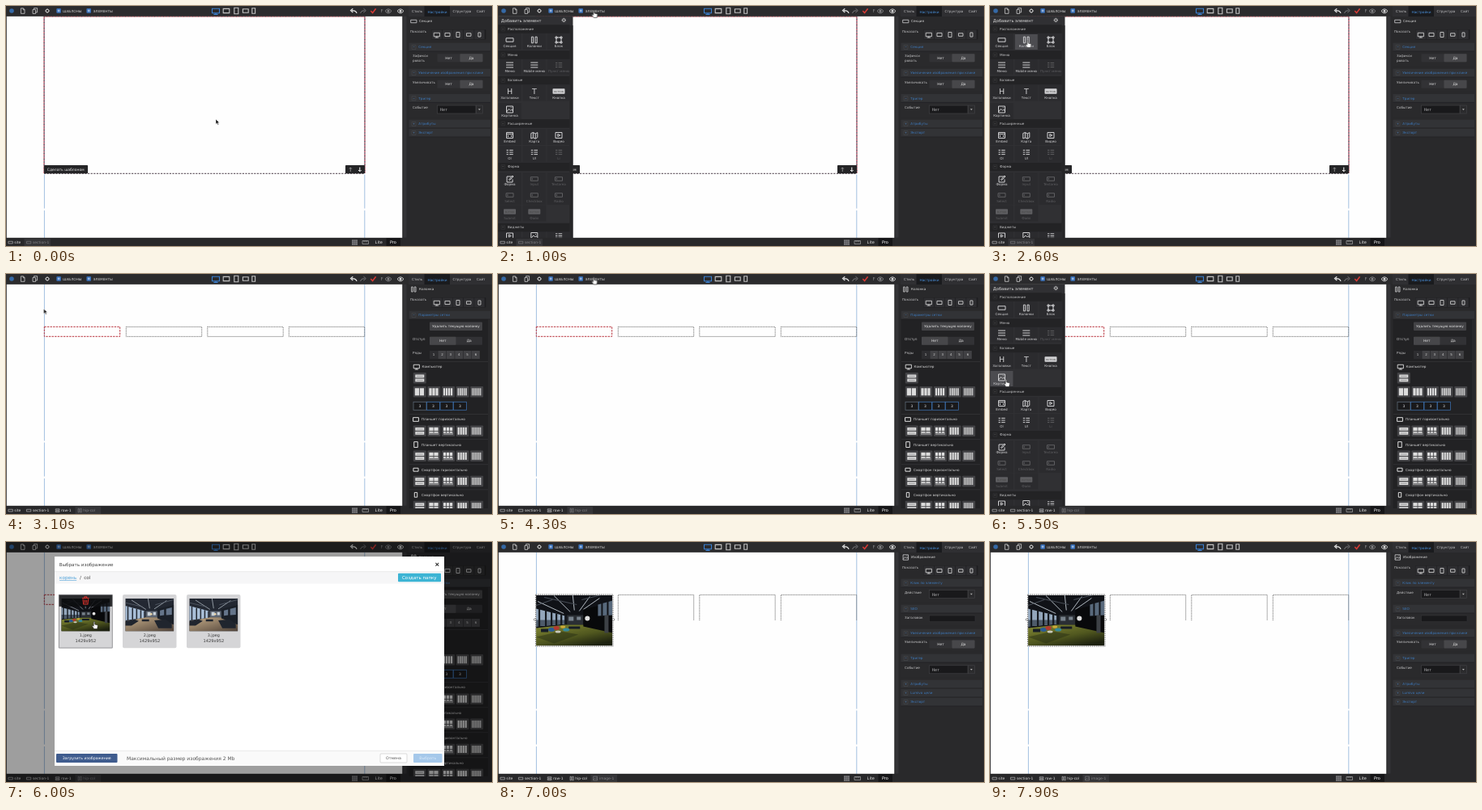
These frames come from a looping animation (600x297 px, 8 s). An HTML page:

```html
<!DOCTYPE html>
<html lang="ru">
<head>
<meta charset="utf-8">
<title>Конструктор страниц</title>
<style>
html, body { margin: 0; width: 100%; height: 100%; overflow: hidden; background: #29292b; }
svg { display: block; width: 100vw; height: 100vh; }
text { font-family: "DejaVu Sans", Verdana, sans-serif; text-rendering: geometricPrecision; white-space: pre; }
.mono { font-family: "DejaVu Sans Mono", monospace; }
.tl { animation: 8s step-end infinite; }
.section { animation-name: section; }
.row { animation-name: row; }
.image { animation-name: image; }
.elements { animation-name: elements; }
.hoverCol { animation-name: hoverCol; }
.hoverPic { animation-name: hoverPic; }
.modal { animation-name: modal; }
.hoverCard { animation-name: hoverCard; }
.picked { animation-name: picked; }
.arrow { animation-name: arrow; }
.hand { animation-name: hand; }
.cursor { animation: move 8s ease-in-out infinite; }
@keyframes section { 0% { visibility: visible } 37.5%, 100% { visibility: hidden } }
@keyframes row { 0% { visibility: hidden } 37.5% { visibility: visible } 87.5%, 100% { visibility: hidden } }
@keyframes image { 0% { visibility: hidden } 87.5%, 100% { visibility: visible } }
@keyframes elements {
  0% { visibility: hidden } 11.25% { visibility: visible } 36.25% { visibility: hidden }
  55% { visibility: visible } 70%, 100% { visibility: hidden }
}
@keyframes hoverCol { 0% { visibility: hidden } 22.5% { visibility: visible } 36.25%, 100% { visibility: hidden } }
@keyframes hoverPic { 0% { visibility: hidden } 66.25% { visibility: visible } 70%, 100% { visibility: hidden } }
@keyframes modal { 0% { visibility: hidden } 70% { visibility: visible } 86.25%, 100% { visibility: hidden } }
@keyframes hoverCard { 0% { visibility: hidden } 73.75% { visibility: visible } 77.5%, 100% { visibility: hidden } }
@keyframes picked { 0% { visibility: hidden } 76.25% { visibility: visible } 86.25%, 100% { visibility: hidden } }
@keyframes arrow {
  0% { visibility: visible } 8.125% { visibility: hidden } 14.375% { visibility: visible }
  20% { visibility: hidden } 37.5% { visibility: visible } 47.5% { visibility: hidden }
  70% { visibility: visible } 73.125% { visibility: hidden }
  77.5% { visibility: visible } 80.625%, 100% { visibility: hidden }
}
@keyframes hand {
  0% { visibility: hidden } 8.125% { visibility: visible } 14.375% { visibility: hidden }
  20% { visibility: visible } 37.5% { visibility: hidden } 47.5% { visibility: visible }
  70% { visibility: hidden } 73.125% { visibility: visible }
  77.5% { visibility: hidden } 80.625% { visibility: visible } 87.5%, 100% { visibility: hidden }
}
@keyframes move {
  0%, 2.5% { transform: translate(259px, 140px) }
  8.75%, 13.75% { transform: translate(118.5px, 6px) }
  23.75%, 38.75% { transform: translate(46.5px, 43px) }
  48.75%, 56.25% { transform: translate(118.3px, 4.5px) }
  67.5%, 70% { transform: translate(20px, 131px) }
  73.75%, 76.875% { transform: translate(109px, 99px) }
  81.25%, 100% { transform: translate(520px, 265px) }
}
</style>
</head>
<body>
<svg id="stage" viewBox="0 0 600 297" preserveAspectRatio="none">
  <defs>
    <linearGradient id="floor" x1="0" y1="0" x2=".7" y2="1"><stop offset="0" stop-color="#848a34"/><stop offset=".6" stop-color="#50571f"/><stop offset="1" stop-color="#1d2110"/></linearGradient>
    <linearGradient id="wood" x1="0" y1="0" x2="1" y2="1"><stop offset="0" stop-color="#c7ae8a"/><stop offset="1" stop-color="#4d4037"/></linearGradient>
    <symbol id="lounge" viewBox="0 0 94 63" preserveAspectRatio="none">
      <rect width="94" height="63" fill="#101217"/>
      <path d="M0 17L36 26V36L0 39z" fill="#93a6bb"/>
      <path d="M0 31L36 31V36L0 39z" fill="#4d5a69"/>
      <path d="M4 17v23M12 19v20M19 21v17M25 23v15M31 24v14M36 25v12" stroke="#161a20" stroke-width="2.2"/>
      <path d="M38 25h20v12H38z" fill="#2a2e34"/>
      <path d="M40 27h6v5h-6zM50 27h5v4h-5z" fill="#78828c"/>
      <path d="M0 41L36 37H60L94 46V63H0z" fill="url(#floor)"/>
      <path d="M2 8L34 23M22 1L42 21M45 0L47 19M66 2L53 20M78 4L58 18" stroke="#c3cbd3" stroke-width=".9"/>
      <path d="M10 3L50 12M56 6L80 0M0 13L20 6" stroke="#454b54" stroke-width="1"/>
      <path d="M58 18L94 9V47L58 39z" fill="#08090b"/>
      <path d="M76 12L94 7V25L76 26z" fill="#58697c"/>
      <path d="M81 10v17M88 8v18" stroke="#101217" stroke-width="2"/>
      <path d="M84 25h5v22h-5z" fill="#3d4146"/>
      <circle cx="63" cy="29" r="3" fill="#e0e0e0"/>
      <path d="M0 52L30 45 52 49 22 60z" fill="#232812" opacity=".45"/>
      <path d="M6 42h9v4H6zM40 39h14v3H40z" fill="#171d26"/>
      <ellipse cx="19" cy="43" rx="4" ry="2.4" fill="#2b5c94"/>
      <ellipse cx="25" cy="41" rx="3.6" ry="2.4" fill="#b23a30"/>
      <ellipse cx="33" cy="39.500" rx="3" ry="1.8" fill="#c9aa38"/>
      <ellipse cx="37" cy="43" rx="4" ry="2" fill="#35899c"/>
      <ellipse cx="27" cy="45.500" rx="3.400" ry="1.500" fill="#c8c8bd"/>
    </symbol>
    <symbol id="office" viewBox="0 0 94 63" preserveAspectRatio="none">
      <rect width="94" height="63" fill="#232832"/>
      <path d="M0 14L38 24V37L0 42z" fill="#a9bfd8"/>
      <path d="M5 15v28M14 18v24M22 20v22M30 22v18M37 24v14" stroke="#252b35" stroke-width="2.4"/>
      <path d="M40 24h22v12H40z" fill="#5e6672"/>
      <path d="M43 26h6v7h-6zM54 26h5v6h-5z" fill="#c9d2da"/>
      <path d="M0 44L40 36H62L94 50V63H0z" fill="url(#wood)"/>
      <path d="M12 3L40 21M44 0L47 19M80 4L56 20" stroke="#cdd6de" stroke-width="1"/>
      <path d="M0 8L34 16M58 12L94 2" stroke="#59616d" stroke-width="1.2"/>
      <path d="M62 20L94 12V50L62 38z" fill="#1b2028"/>
      <path d="M67 23l8-2v11l-8 1zM79 20l11-3v14l-11 1z" fill="#65758a"/>
      <path d="M0 44l18-4 8 3-14 9H0zM56 42l22-2 12 9v8H64zM32 40h14v4H32z" fill="#20252e"/>
      <circle cx="50" cy="30" r="2" fill="#f0d9a8"/>
    </symbol>
  </defs>
</svg>
<script>
const BLUE = '#3c79bd', GREY = '#c4c4c6', DIM = '#5e5e61';

const T = (x, y, s, fill = GREY, size = 4.15, anchor = 'start', more = '') =>
  `<text x="${x}" y="${y + size * .36}" fill="${fill}" font-size="${size}" text-anchor="${anchor}" ${more}>${s}</text>`;
const M = (x, y, s, fill, size) => T(x, y, s, fill, size, 'middle');
const R = (x, y, w, h, fill, more = '') => `<rect x="${x}" y="${y}" width="${w}" height="${h}" fill="${fill}" ${more}/>`;
const P = (d, stroke = GREY, w = .9, more = '') => `<path d="${d}" fill="none" stroke="${stroke}" stroke-width="${w}" ${more}/>`;
const at = (x, y, s, k = 1) => `<g transform="translate(${x} ${y}) scale(${k})">${s}</g>`;
const G = (name, s) => `<g class="tl ${name}">${s}</g>`;
const box = (w, h) => `M${-w / 2} ${-h / 2}h${w}v${h}h${-w}z`;

const DEVICES = [box(9, 5.6) + 'M0 3v1.6M-2.6 4.4h5.2', box(7.6, 5.2), box(5, 7.6), box(6.8, 4.4), box(3.8, 6.4)];
const device = (i, x, y, color, k) => at(x, y, P(DEVICES[i], color, 1.1), k);

const SHAPES = {
  section: box(9, 4.4),
  column: 'M-3.4-3.8h2.2v7.6h-2.2zM1.2-3.8h2.2v7.6h-2.2z',
  block: box(6, 6) + 'M-4-4h2v2h-2zM2-4h2v2h-2zM-4 2h2v2h-2zM2 2h2v2h-2z',
  menu: 'M-4.5-3h9M-4.5 0h9M-4.5 3h9',
  list: 'M-4-2.6h2.4M-4 0h2.4M-4 2.6h2.4M-.4-2.6h4.6M-.4 0h4.6M-.4 2.6h4.6',
  image: box(8, 8) + 'M-4 3l3-3.6 2 2 1.4-1.4L4 2M1.3-2h1',
  embed: box(8, 7) + 'M-4-1.6h8M-1.5 0L-2.6 1l1.1 1M1.5 0l1.1 1-1.1 1',
  map: 'M-4-2.5l2.6-1v6.5l-2.6 1zM-1.4-3.5L1.4-2v6.2l-2.8-1.2M1.4-2L4-3.4v6L1.4 4.2',
  video: box(8, 7) + 'M-1.2-1.6L1.8 0l-3 1.6z',
  form: 'M2.5-3h-6v7h7v-3.5M-1 1l4.5-5 1 1-4.5 4.6z',
  field: box(9, 4.6) + 'M-2.6-1.2v2.4',
  row: 'M-4-3h8v2.4h-8zM-4 .8h8v2.4h-8z',
  gear: 'M0-1.8a1.8 1.8 0 1 0 .1 0M0-3v1M0 2v1M-3 0h1M2 0h1M-2-2l.7.7M1.3 1.3l.7.7M2-2l-.7.7M-1.3 1.3l-.7.7'
};
const icon = (name, x, y, color = '#d4d4d6', k = 1) => at(x, y, P(SHAPES[name], color, 1), k);

function canvas() {
  const guide = x => P(`M${x} 13V206.5M${x} 208.5V250.5M${x} 253V287`, '#a3c0e0', 1);
  const cells = d => [148, 248.5, 349].map(x =>
    P(d, '#5c5c5c', .8, `transform="translate(${x} 0)" stroke-dasharray="1.2 .8"`)).join('');
  const frame = 'M47 207V13H443V207';
  const around = 'M46.5 65H142V129H46.5z';
  return R(.8, 12.5, 488.7, 274.5, '#fefefe') + guide(47.4) + guide(442.8) +
    G('section',
      P(frame, '#c23a46', 1.1, 'stroke-dasharray="2.4 1.2"') +
      P(frame, '#3a2b30', 1.1, 'stroke-dasharray="1.2 2.4" stroke-dashoffset="1.2"') +
      P('M47 207.3H443', '#4a3c48', 1, 'stroke-dasharray="2.2 1.4"') +
      R(47, 197, 54, 10.3, '#252527', 'rx=".8"') + T(50.8, 202, 'Сделать шаблоном', '#e8e8e8', 4.5) +
      R(419, 197, 24, 10.3, '#252527', 'rx=".8"') +
      P('M425.3 205v-5M423.8 201.6l1.5-1.7 1.5 1.7', '#a0a0a0', .8) +
      P('M436.8 199.6v5M435 203l1.8 1.8 1.8-1.8', '#fff', 1)) +
    G('row', P('M47.3 65.3H140.7V77.3H47.3z', '#b8323c', 1, 'stroke-dasharray="2.4 1.2"') +
      cells('M.3 65.4H93.7V77.4H.3z')) +
    G('image', cells('M.3 97V65.4H93.7V97') +
      '<use href="#lounge" x="47" y="65.5" width="94.5" height="63"/>' +
      P(around, '#fff', 1.2) + P(around, '#444', .8, 'stroke-dasharray="1.4 1.2"') +
      [45.6, 142.4].map(x => `<circle cx="${x}" cy="96" r="1.4" fill="#fff" stroke="#555" stroke-width=".6"/>`).join(''));
}

function topBar() {
  const plus = x => R(x, 3, 5.6, 5.8, '#3a70b8', 'rx="1"') + P(`M${x + 1.3} 5.9h3M${x + 2.8} 4.4v3`, '#dbe8f8', .7);
  const eye = (x, c) => P(`M${x - 4} 6.3q4-5 8 0q-4 5-8 0z`, c, .9) + `<circle cx="${x}" cy="6.3" r="1.4" fill="${c}"/>`;
  return R(0, 0, 600, 12.7, '#2b2b2d') +
    '<circle cx="7" cy="6" r="2.8" fill="#3569a6"/>' +
    P('M18.4 2.8h3l1.6 1.7v4.8h-4.6zM21.2 2.8v1.9h1.8', '#ccc', .8) +
    P('M33 4.4h3.6v5H33zM34.6 4.2V2.6h4v5.2h-2', '#ccc', .8) +
    icon('gear', 51, 6, '#d4d4d4', .95) +
    plus(62.3) + T(70, 6.2, 'ШАБЛОНЫ', '#d0d0d0', 4.2) +
    plus(99.4) + T(107.4, 6.2, 'ЭЛЕМЕНТЫ', '#d0d0d0', 4.2) +
    [259, 272, 284.3, 295.8, 305.7].map((x, i) => device(i, x, 6, i ? '#c4c4c4' : '#3b80d0', 1)).join('') +
    P('M433 9q-.6-3.6-6-3.4M428.3 3.2l-2.8 2.4 2.8 2.4', '#e4e4e4', 1.2) +
    P('M437.5 9q.6-3.6 5-3.4M441.5 3.2l2.8 2.4-2.8 2.4', '#77777a', 1) +
    P('M450.3 6l2.3 2.6 4-5.4', '#d23b35', 1.6) +
    T(462.5, 6.2, 'F', '#8a8a8c', 5.5) + eye(472, '#8a8a8c') + eye(487, '#e4e4e4');
}

function bottomBar() {
  const crumbs = [
    [3, 'site', 'section', 10.3], [25.5, 'section-1', 'section', 33], [61, 'row-1', 'row', 68],
    [88.5, 'hip-col', 'column', 95.2], [117.5, 'image-1', 'image', 125]
  ];
  const trail = n => crumbs.slice(0, n).map(([ix, label, shape, x], i) => {
    const last = i === n - 1;
    return (last ? R(ix - 3, 288, x - ix + 25, 9, '#353538') : '') +
      icon(shape, ix + 2.6, 292.6, last ? '#858588' : '#c8c8ca', .6) +
      T(x, 292.6, label, last ? '#858588' : '#e0e0e0', 4.45);
  }).join('');
  return R(0, 286.8, 490, 10.2, '#28282a') +
    G('section', trail(2)) + G('row', trail(4)) + G('image', trail(5)) +
    R(427, 289.3, 7, 6.6, '#77777a') + P('M429.3 289.3v6.6M431.7 289.3v6.6M427 291.5h7M427 293.7h7', '#4a4a4c', .4) +
    P('M440 290.5h7.5v4h-7.5zM442 290.5v1.8M443.8 290.5v1.8M445.6 290.5v1.8', '#aaa', .7) +
    R(469.5, 287, 17.5, 10, '#161618') +
    T(455.6, 292.3, 'Lite', '#e4e4e4', 5) + T(474, 292.3, 'Pro', '#fff', 5);
}

// Right-hand settings
const head = (y, title, sign = '−') => R(497.5, y - 5.3, 100.5, 10.3, '#323336') +
  P(`M497.5 ${y + 5}h100.5`, '#1f1f21', .7) +
  P(`M501 ${y - 2.5}h5v5h-5z`, '#47484c', .6) + M(503.5, y, sign, '#5c8fc8', 3.6) + T(509.3, y, title, BLUE);
const card = (y, h) => R(497.5, y, 100.5, h, '#2a2a2c');
const toggle = (y, x = 532.5, on = 1, w = 56) => {
  const half = w / 2;
  return R(x, y, w, 10, '#323235', 'rx=".8"') + R(x + on * half, y, half, 10, '#47474a', 'rx=".8"') +
    M(x + half / 2, y + 5, 'Нет', '#e2e2e2', 4.4) + M(x + half * 1.5, y + 5, 'Да', '#e2e2e2', 4.4);
};
const select = y => R(532.5, y, 47.5, 10, '#19191b', 'stroke="#434346" stroke-width=".6"') +
  R(580.5, y, 7.8, 10, '#2b2b2d', 'stroke="#434346" stroke-width=".6"') +
  T(535.8, y + 5.2, 'Нет', '#a8a8aa', 5.2, 'start', 'class="mono"') +
  `<path d="M583 ${y + 4.3}h2.8l-1.4 1.7z" fill="#bbb"/>`;
const title = (shape, s) => icon(shape, 503.3, 19, '#d0d0d2', .8) + T(510, 19, s, '#d8d8d8') +
  T(499, 31.3, 'Показать') + R(525, 29, 67.5, 12.5, '#1e1e20', 'rx="1"') +
  [531.8, 545, 558, 571.3, 584.5].map((x, i) =>
    R(x - 6.3, 29.5, 12.6, 11.5, '#2e2e31') + device(i, x, 35.5, '#d0d0d0', .8)).join('');

const sectionPanel = () => title('section', 'Секция') +
  card(46, 28) + head(51, 'Секция') + T(502, 62, 'Зафикси') + T(502, 67.8, 'ровать') + toggle(59.3) +
  card(78, 27) + head(83, 'Увеличение изображения при клике') + T(502, 94.5, 'Увеличивать') + toggle(91.7) +
  card(109, 28) + head(114.3, 'Тригер') + T(502, 125.8, 'Событие') + select(123) +
  head(146, 'Атрибуты', '+') + head(157, 'Экспорт', '+');

const imagePanel = () => title('image', 'Изображение') +
  card(46, 28) + head(51, 'Клик по элементу') + T(502, 62.3, 'Действие') + select(59.5) +
  card(78, 25) + head(83, 'SEO') + T(502, 94, 'Заголовок') + R(532.5, 91, 56.5, 7.5, '#19191b', 'stroke="#363638" stroke-width=".5"') +
  card(108, 26) + head(113, 'Увеличение изображения при клике') + T(502, 124, 'Увеличивать') + toggle(121.5) +
  card(139, 28) + head(144, 'Тригер') + T(502, 155.5, 'Событие') + select(152.8) +
  head(176, 'Атрибуты', '+') + head(187, 'Lumivo цели', '+') + head(198, 'Экспорт', '+');

// Grid preset button: stacked rows, plain bars, or bars with a second row
function preset(x, y, n, kind) {
  let s = R(x, y, 16, 13.5, '#434346', 'rx=".8"');
  if (kind === 'rows') {
    for (const dy of [2.5, 7.5]) s += R(x + 2.5, y + dy, 11, 3.8, '#dcdcdc') + P(`M${x + 4} ${y + dy + 1.9}h8`, '#77777a', .7);
    return s;
  }
  const step = 12 / n;
  for (let i = 0; i < n; i++) s += R(x + 2 + i * step, y + 2.3, step - .8, 9, '#dcdcdc');
  if (kind === 'grid') s += R(x + 2, y + 6.5, 12, .9, '#434346') + R(x + 2, y + 9, 12, 2.5, '#858587');
  return s;
}
const slots = [502.8, 520.4, 538, 555.6, 573.2];

function columnPanel() {
  let s = title('column', 'Колонка') + R(497.5, 46, 97.5, 244, '#222224') + head(51, 'Параметры сетки');
  s += R(523, 59.5, 65, 10.5, '#434346', 'rx="1"') + M(555.5, 64.8, 'Удалить текущую колонку', '#eee', 4.15);
  s += T(502, 81, 'Отступ') + toggle(77.7, 523, 0, 65) + T(502, 98, 'Ряды');
  for (let i = 0; i < 6; i++) s += R(523 + i * 10.4, 95, 9.9, 10, i ? '#414144' : '#2d2d30') + M(528 + i * 10.4, 100, i + 1, '#d0d0d0', 4);
  s += P('M498 108.5h97', '#37373a', .7) + device(0, 506.8, 114.5, '#e0e0e0', .8) + T(513.5, 115, 'Компьютер', '#d8d8d8');
  s += preset(502.8, 122, 2, 'rows') + slots.map((x, i) => preset(x, 139, i + 2)).join('');
  for (let i = 0; i < 4; i++) s += R(503 + i * 16.5, 158.3, 16, 10, '#19191b', `stroke="${i ? '#3b6ca6' : '#5a6672'}" stroke-width=".8"`) + M(511 + i * 16.5, 163.4, 3, '#ddd', 4.5);
  const names = ['Планшет горизонтально', 'Планшет вертикально', 'Смартфон горизонтально', 'Смартфон вертикально'];
  names.forEach((name, i) => {
    const y = 180 + i * 31.1;
    s += P(`M498 ${y - 6.5}h97`, '#37373a', .7) + device(i + 1, 506, y, '#e0e0e0', .9) + T(513, y, name, '#d8d8d8');
    s += slots.map((x, j) => preset(x, y + 7.5, [2, 2, 3, 4, 6][j], ['rows', 'grid', 'grid'][j])).join('');
  });
  return s + R(495, 290, 105, 7, '#29292b');
}

function rightPanel() {
  return R(489.5, 12.6, 110.5, 284.4, '#29292b') + R(490.5, 12.6, 4, 274, '#343437') +
    R(497, 0, 103, 13, '#2f2f32') + R(516.5, 0, 31.5, 13, '#1a1b1e') +
    T(501, 7, 'Стиль') + T(520.5, 7, 'Настройки', '#4a90dc', 4.25) + T(551.5, 7, 'Структура') + T(581, 7, 'Сайт') +
    G('section', sectionPanel()) + G('row', columnPanel()) + G('image', imagePanel());
}

// Elements palette: [icon y, label y, tiles]; "~" marks a dimmed tile
const palette = [
  [28.5, 'Расположение'], [60.5, 'Меню'], [92, 'Базовые'], [145.5, 'Расширенные'], [199, 'Форма'], [274, 'Виджеты']
];
const tiles = [
  [42, 50, 'section:Секция', 'column:Колонки', 'block:Блок'],
  [73, 80.5, 'menu:Меню', 'menu:Mobile меню', 'list:~Пункт меню'],
  [105.5, 114, 'H:Заголовки', 'T:Текст', 'button:Кнопка'],
  [128, 135.5, 'image:Картинка'],
  [160, 168, 'embed:Embed', 'map:Карта', 'video:Видео'],
  [181, 189, 'list:Ol', 'list:Ul', 'list:~Li'],
  [214, 221, 'form:Форма', 'field:~Input', 'field:~Textarea'],
  [234, 241.5, 'field:~Select', 'field:~Checkbox', 'field:~Radio'],
  [254.5, 262.5, 'button:~Submit', 'button:~Файл'],
  [284.5, 293, 'video:Слайдер', 'image:Галерея', 'list:Вкладки']
];
const centers = [14.5, 44.8, 75];

function elementsPanel() {
  let s = R(0, 12.6, 92.5, 274.4, '#303033') + R(88.5, 24, 4, 263, '#252527') +
    T(3.8, 18.3, 'Добавить элемент', '#e0e0e0', 5.1) + icon('gear', 81.3, 17.5, '#ddd', .9);
  const glyph = (shape, x, y, color) => {
    if (shape.length === 1) return M(x, y, shape, color, 9.5);
    if (shape === 'button') return R(x - 7.5, y - 3.3, 15, 6.5, color, 'rx=".8"') + M(x, y, 'BUTTON', '#444', 2.8);
    return icon(shape, x, y, color);
  };
  for (const [iy, ty, ...row] of tiles) {
    row.forEach((entry, i) => {
      const x = centers[i], [shape, name] = entry.split(':'), dim = name[0] === '~';
      s += R(x - 14.5, iy - 8, 29, 20, '#2b2b2e');
      if (name === 'Колонки') s += G('hoverCol', R(x - 14, iy - 7, 28, 19, '#4c4c50'));
      if (name === 'Картинка') s += G('hoverPic', R(x - 14, iy - 8, 28, 19, '#4c4c50'));
      s += glyph(shape, x, iy, dim ? DIM : '#d0d0d2') + M(x, ty, name.replace('~', ''), dim ? DIM : '#d2d2d4', 4.1);
    });
  }
  for (const [y, name] of palette) s += R(0, y - 5.3, 88.5, 10.6, '#232325') +
    P(`M4 ${y - 2.3}h4.6v4.6h-4.6z`, '#3a3a3d', .5) + M(6.3, y, '−', '#888', 3.5) + T(12, y, name);
  return s;
}

function dialog() {
  const button = (x, w, s, bg, color, more = '') => R(x, 262, w, 11, bg, 'rx="1" ' + more) + M(x + w / 2, 267.6, s, color, 4.7);
  const file = (x, n, photo) => R(x, 65, 66.5, 66.3, '#d5d5d7', 'rx="2"') +
    `<use href="#${photo}" x="${x + 3.3}" y="70" width="60" height="40.5"/>` +
    M(x + 33.3, 115.6, n + '.jpeg', '#3a3a3a', 4.9) + M(x + 33.3, 122.6, '1429x952', '#3a3a3a', 5.1);
  const outline = P('M65.3 65.3h66v65.8h-66z', '#77777a', .7);
  return R(0, 0, 600, 297, '#000', 'opacity=".38"') + R(60, 18, 481, 259, '#fff') +
    T(65.8, 27.5, 'Выбрать изображение', '#444', 5.6) + P('M530.4 25.8l3.8 3.8M534.2 25.8l-3.8 3.8', '#333', 1.1) +
    R(60, 36.7, 481, 14.8, '#f6f6f7') + P('M60 36.7h481', '#e6e6e6', .8) +
    T(66, 44.3, 'корень', '#4a9fd8', 5.7, 'start', 'text-decoration="underline"') +
    T(91, 44.3, '/', '#444', 5.7) + T(96.2, 44.3, 'col', '#444', 5.7) +
    R(484, 38.7, 53, 10.6, '#3cb4d4', 'rx="1"') + M(510.3, 44, 'Создать папку', '#fff', 5.5) +
    file(65, 1, 'lounge') + file(144, 2, 'office') + file(223, 3, 'office') +
    G('hoverCard', R(65.3, 65.3, 66, 14.5, '#0c0d10', 'opacity=".85"') +
      P('M94 69.5h8.5M97 69.3v-1.5h2.6v1.5M95 70.5l.7 6.500h5.2l.7-6.500M97.3 71.5v4M99.3 71.5v4', '#d8322c', 1.1) + outline) +
    G('picked', outline) +
    R(60, 258.5, 481, 18.5, '#fafafa') + P('M60 258.5h481', '#e4e4e4', .7) +
    button(62, 75.5, 'Загрузить изображение', '#3f5c8e', '#fff') +
    T(149, 267.6, 'Максимальный размер изображения 2 Mb', '#555', 6) +
    button(462, 33, 'Отмена', '#fff', '#555', 'stroke="#ccc" stroke-width=".7"') +
    button(503, 35.5, 'Выбрать', '#a5c8ea', '#d9eafa') +
    G('picked', button(503, 35.5, 'Выбрать', '#3f86cc', '#fff'));
}

const cursor = () => `<g class="cursor">` +
  G('arrow', '<path d="M0 0v6.2l1.5-1.3 1.1 2.3 1-.5-1-2.2h1.9z" fill="#111" stroke="#fff" stroke-width=".5"/>') +
  G('hand', '<path d="M-.8 0q.8-.9 1.5 0v3l3.2.8q.6.3.4 1.2l-.6 3.5h-4l-2.5-3.5q.2-1 1.2-.4l.8.7z" fill="#fff" stroke="#222" stroke-width=".6"/>') +
  '</g>';

document.getElementById('stage').insertAdjacentHTML('beforeend',
  R(0, 0, 600, 297, '#29292b') + canvas() + G('elements', elementsPanel()) +
  topBar() + rightPanel() + bottomBar() + G('modal', dialog()) + cursor());
</script>
</body>
</html>
```
